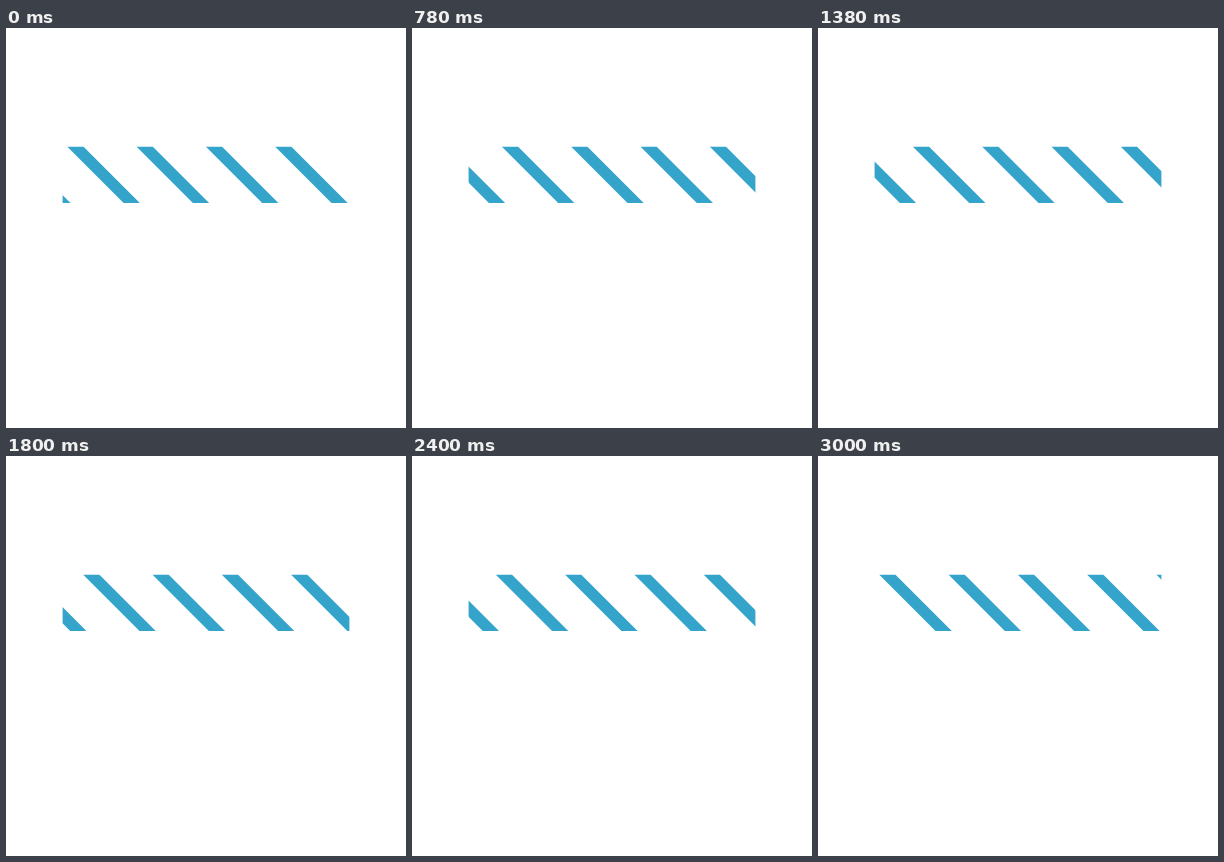
Animation of 400x400 px, one loop 3030 ms. Source, as an HTML page:

```html
<!DOCTYPE html>
<html lang="en">
<head>
<meta charset="utf-8">
<title>Moving stripes</title>
<style>
  html, body { margin: 0; width: 100%; height: 100%; overflow: hidden; background: #fff; }
  svg { display: block; width: 400px; height: 400px; }
</style>
</head>
<body>
<svg viewBox="0 0 400 400">
  <clipPath id="bar"><rect x="56.6" y="118.5" width="286.8" height="56.5"/></clipPath>
  <g clip-path="url(#bar)"><path id="stripes" fill="#34a4cb"/></g>
</svg>
<script>
const STEP = 30, STEPS = 101;
const GAP = 69.3, COUNT = 5, WIDTH = 16.2;
const TOP = 118.5, HEIGHT = 56.5, START = -8.2;

// [step, distance travelled]
const TRAVEL = [
  [0, 0], [17, 65.5], [26, 97.9], [46, 172.2],
  [60, 223.8], [80, 299.7], [100, 5 * GAP - 0.05]
];

const stripes = document.getElementById('stripes');

stripes.setAttribute('d', Array.from({ length: COUNT }, (_, i) =>
  `M${i * GAP} ${TOP}h${WIDTH}l${HEIGHT} ${HEIGHT}h${-WIDTH}z`).join(''));

function travel(step) {
  const i = TRAVEL.findIndex(([end], k) => k > 0 && step <= end);
  const [a, from] = TRAVEL[i - 1], [b, to] = TRAVEL[i];
  return from + (to - from) * (step - a) / (b - a);
}

function draw(time) {
  const step = Math.floor(time / STEP) % STEPS;
  const x = START + travel(step) % GAP;
  stripes.setAttribute('transform', `translate(${x.toFixed(2)} 0)`);
}

const begin = performance.now();
function tick() {
  draw(performance.now() - begin);
  requestAnimationFrame(tick);
}
tick();
</script>
</body>
</html>
```
